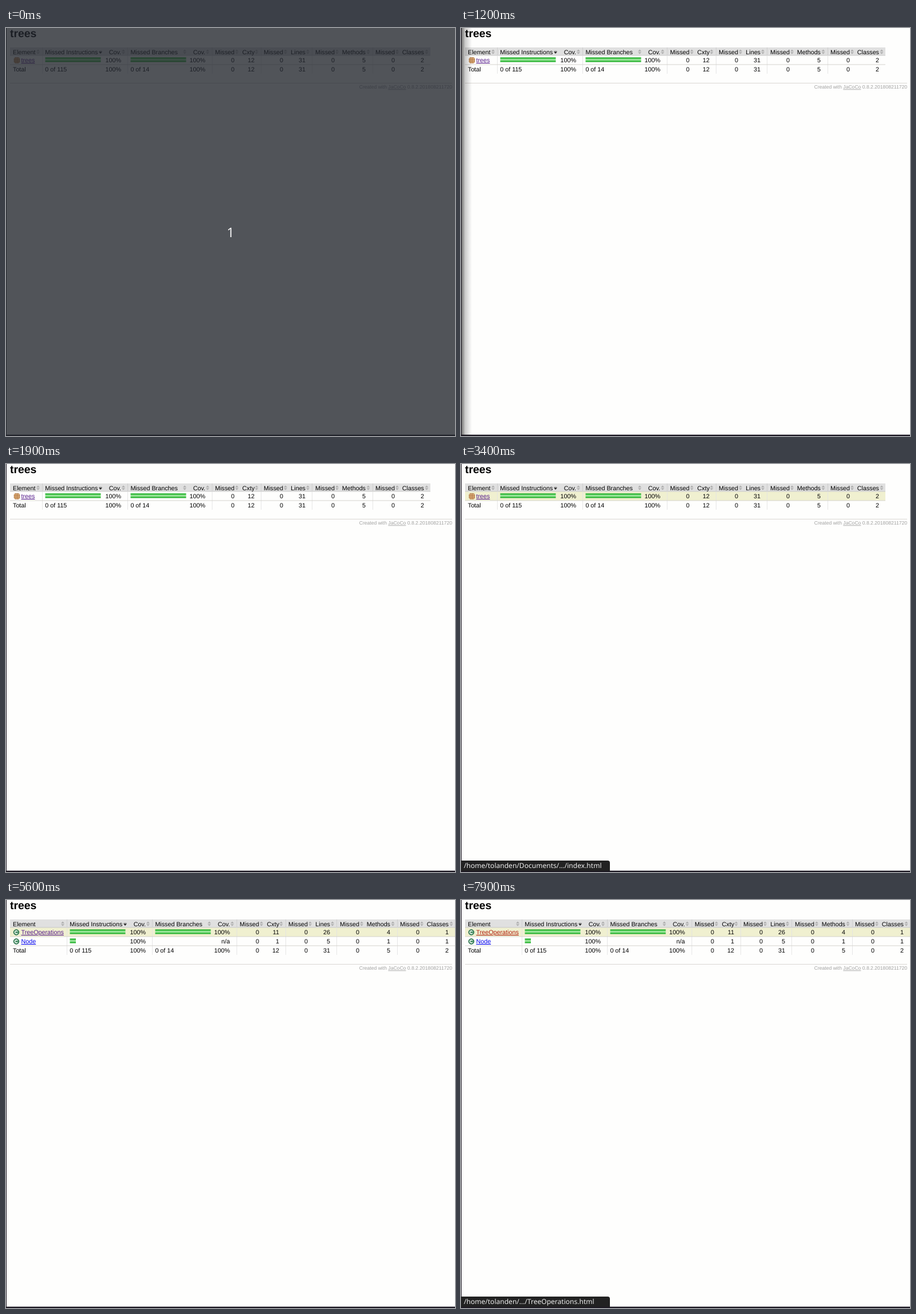
These frames come from a looping animation (784 px wide and 714 px high, 8 s). An HTML page:

```html
<!DOCTYPE html>
<html lang="en">
<head>
<meta charset="utf-8">
<title>Coverage report</title>
<style>
html, body { margin: 0; width: 100%; height: 100%; overflow: hidden; background: #fefefd; }
svg { display: block; font: 10.75px "Liberation Sans", Arial, sans-serif; text-rendering: geometricPrecision; }
.end { text-anchor: end; }
.link { text-decoration: underline; fill: #551a8b; }
.new { fill: #0000ee; }
.active { fill: #b01c0c; }
.foot { font-size: 8.6px; fill: #a0a0a0; text-anchor: end; }
.hover { fill: #f0f0d0; }
</style>
</head>
<body>
<svg id="stage" width="784" height="714" viewBox="0 0 784 714">
  <defs>
    <linearGradient id="green" x2="0" y2="1">
      <stop offset="0" stop-color="#2cae34"/>
      <stop offset=".22" stop-color="#2fba37"/>
      <stop offset=".4" stop-color="#9be59b"/>
      <stop offset=".6" stop-color="#9be59b"/>
      <stop offset=".8" stop-color="#2fba37"/>
      <stop offset="1" stop-color="#2cae34"/>
    </linearGradient>
    <linearGradient id="dark">
      <stop offset="0" stop-opacity=".55"/>
      <stop offset=".35" stop-opacity=".2"/>
      <stop offset="1" stop-opacity="0"/>
    </linearGradient>
  </defs>
  <text x="7" y="16" font-size="19.4" font-weight="bold">trees</text>
  <g id="overview"></g>
  <g id="detail"></g>
  <path d="M0 711.5H784" stroke="#b8b8ba"/>
  <path d="M0 0H1V712H784V714H0Z" fill="#1c1822"/>
  <rect id="shadow" x="1" width="18" height="712" fill="url(#dark)"/>
  <g id="status">
    <path d="M0 712V694H256Q260 694 260 698V712Z" fill="#222"/>
    <text id="path" x="5" y="707" fill="#eee" font-size="12.05" font-family="Noto Sans, sans-serif"></text>
  </g>
  <g id="countdown">
    <rect width="784" height="714" fill="rgb(35,39,46)" fill-opacity=".79"/>
    <text x="392" y="365.5" fill="#fff" font-size="23" text-anchor="middle" font-family="Open Sans, sans-serif">1</text>
  </g>
</svg>
<script>
const $ = id => document.getElementById(id);

// Numeric columns: heading, right edge of the text, sort icon
const columns = [
  ['Cov.', 201, 205], ['Cov.', 348, 352], ['Missed', 399, 403], ['Cxty', 434, 437.5],
  ['Missed', 484, 488], ['Lines', 523, 527], ['Missed', 574, 578], ['Methods', 628, 632.5],
  ['Missed', 679, 683], ['Classes', 730, 734.5]
];
const dividers = [63.5, 212.5, 360, 445.5, 534.5, 640.5];

const text = (x, y, s, cls = '') => `<text x="${x}" y="${y}" class="${cls}">${s}</text>`;
const line = (d, color) => `<path d="${d}" stroke="${color}" stroke-width=".9"/>`;
const sorter = x => `<path d="M${x - 3} 41l3-3.4 3 3.4zm0 1.3l3 3.4 3-3.4z" fill="#b0b0b0"/>`;
const bar = (x, y, w) => `<rect x="${x}" y="${y + 3.4}" width="${w}" height="8.2" fill="url(#green)"/>`;

const packageIcon = y => `<rect x="14.5" y="${y + 4}" width="9" height="9" rx="1.5" fill="#edc99a" stroke="#b27840"/>
  <path d="M17.5 ${y + 3}v11M20.5 ${y + 3}v11M13.5 ${y + 7}h11M13.5 ${y + 10}h11" stroke="#a5622c" stroke-width=".9"/>`;
const classIcon = y => `<circle cx="18" cy="${y + 8.5}" r="4.8" fill="#4b9068" stroke="#2f7350"/>
  <path d="M20 ${y + 7}a2.5 2.5 0 1 0 0 3" fill="none" stroke="#fff" stroke-width="1.3"/>`;

// A report table; dx moves all columns after the first
function report(id, dx, icon, rows, total) {
  const right = Math.min(784, 741 + dx), foot = 48 + rows.length * 16;
  const numbers = (values, y) => values.map((v, i) => text(columns[i][1] + dx, y, v, 'end')).join('');
  let s = `<rect x="7" y="34" width="${right - 7}" height="14" fill="#e0e0e0"/>`;
  s += rows.map((r, i) => `<rect id="${id}${i}" class="hover" x="7" y="${48 + i * 16}" width="${right - 7}" height="16"/>`).join('');
  s += line(`M7 48H${right}`, '#c4c4c4');
  for (const x of dividers)
    s += line(`M${x + dx} 34V48`, '#ccc') + line(`M${x + dx} 48V${foot + 16}`, '#e4e4e4');

  s += text(12, 45.5, 'Element') + sorter(56 + dx);
  s += text(68.3 + dx, 45.5, 'Missed Instructions') + text(217.4 + dx, 45.5, 'Missed Branches') + sorter(312 + dx);
  s += `<path d="M${162 + dx} 41.6h6l-3 3.4z" fill="#222"/>` + line(`M${162.5 + dx} 40.4h5`, '#888');
  s += numbers(columns.map(c => c[0]), 45.5) + columns.map(c => sorter(c[2] + dx)).join('');

  rows.forEach(([name, cls, widths, values], i) => {
    const y = 48 + i * 16;
    s += icon(y) + `<text id="${id}Link${i}" x="26.5" y="${y + 12}" class="link ${cls}">${name}</text>`;
    s += widths.map((w, j) => bar(68.5 + j * 149 + dx, y, w)).join('');
    s += numbers(values, y + 12) + line(`M7 ${y + 16}H${right}`, '#d0cdc8');
  });
  s += text(12, foot + 12, 'Total') + text(68.3 + dx, foot + 12, '0 of 115') + text(217.4 + dx, foot + 12, '0 of 14');
  s += numbers(total, foot + 12) + line(`M7 ${foot + 32.5}H779`, '#d6d3ce');
  s += text(779, foot + 42.3, 'Created with <tspan text-decoration="underline">JaCoCo</tspan> 0.8.2.201808211720', 'foot');
  $(id).innerHTML = s;
}

const total = ['100%', '100%', 0, 12, 0, 31, 0, 5, 0, 2];
report('overview', 0, packageIcon, [['trees', '', [97, 97], total]], total);
report('detail', 43, classIcon, [
  ['TreeOperations', '', [97, 97], ['100%', '100%', 0, 11, 0, 26, 0, 4, 0, 1]],
  ['Node', 'new', [10.5], ['100%', 'n/a', 0, 1, 0, 5, 0, 1, 0, 1]]
], total);

const home = '/home/tolanden/';
const show = (id, on) => $(id).style.opacity = +on;

// Value of the last [time, value] step reached
const step = (t, steps) => steps.reduce((v, [at, next]) => t >= at ? next : v, 0);

function draw(now) {
  const t = now % 8000, within = (a, b) => t >= a && t < b;
  show('countdown', t < 100);
  show('overview', t < 5100);
  show('detail', t >= 5100);
  show('overview0', within(600, 700) || within(3100, 5100));
  show('detail0', within(5600, 5900) || t >= 7600);
  show('detail1', within(5900, 7400));
  $('overviewLink0').classList.toggle('active', within(4900, 5000));
  $('detailLink0').classList.toggle('active', t >= 7900);
  show('shadow', step(t, [[900, .25], [1000, .5], [1100, .75], [1200, 1], [1500, .6], [1600, .25], [1900, 0]]));
  show('status', step(t, [[3300, .5], [3400, 1], [5200, .5], [5300, 0], [6000, 1]]));
  $('path').textContent = home + (t < 5600 ? 'Documents/…/index.html'
    : t < 7700 ? 'Documents/…/Node.html' : '…/TreeOperations.html');
}

const start = performance.now();
function tick() {
  draw(performance.now() - start);
  requestAnimationFrame(tick);
}
tick();
</script>
</body>
</html>
```
